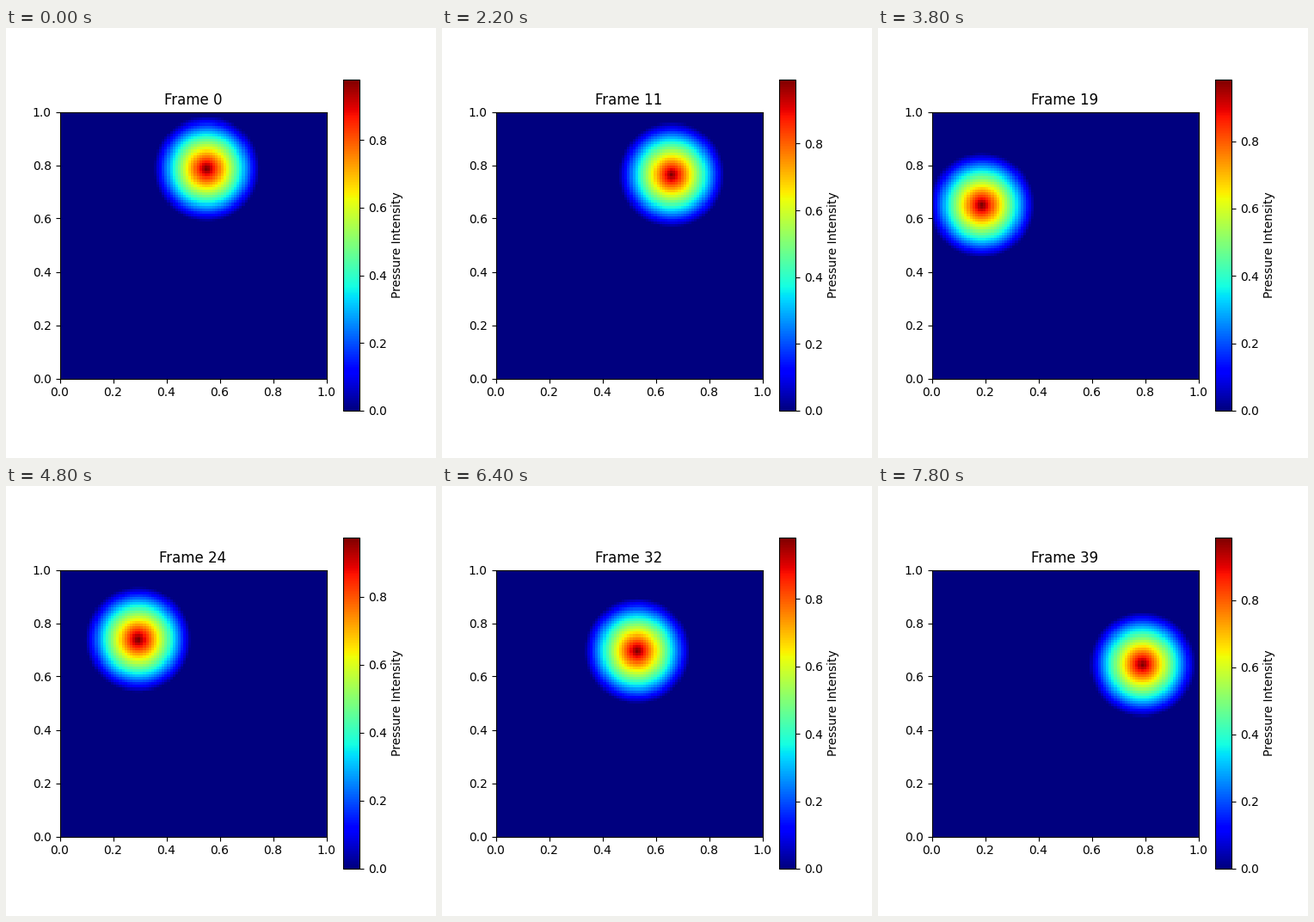
Recreate the animation shown at these times as a matplotlib script. Size 500 by 500 pixels, loop 8 s.

```python
import math
from itertools import pairwise

import matplotlib.pyplot as plt
import numpy as np
from matplotlib.animation import FuncAnimation

FRAMES = 40
RADIUS = 0.2
CELLS = 100
SWING = 0.13  # sideways pull-back and overshoot between stops

# Stops of the spot: step, x, y
STOPS = [(0, 0.5485, 0.7911), (7, 0.5575, 0.7510), (15, 0.7586, 0.7859),
         (19, 0.1825, 0.6532), (24, 0.2899, 0.7434), (32, 0.5275, 0.6998),
         (39, 0.7890, 0.6489)]

axis = np.linspace(0, 1, CELLS)
X, Y = np.meshgrid(axis, axis)


def contact(i):
    """Centre of the spot: swings rightward, lifts and jumps to go back."""
    (s0, x0, y0), (s1, x1, y1) = next(
        pair for pair in pairwise(STOPS) if i < pair[1][0] or i == FRAMES - 1 == pair[1][0])
    if x1 < x0:
        return x0, y0
    t = (i - s0) / (s1 - s0)
    x = x0 + (x1 - x0) * t - SWING * math.sin(2 * math.pi * t)
    return x, y0 + (y1 - y0) * t


def pressure(i):
    x, y = contact(i)
    return np.clip(1 - np.hypot(X - x, Y - y) / RADIUS, 0, 1)


fig, ax = plt.subplots(figsize=(5, 5), dpi=100)
image = ax.imshow(pressure(0), cmap="jet", origin="lower",
                  extent=[0, 1, 0, 1])
fig.colorbar(image, ax=ax, label="Pressure Intensity")
title = ax.set_title("Frame 0")


def update(i):
    field = pressure(i)
    image.set_data(field)
    image.set_clim(0, field.max())
    title.set_text(f"Frame {i}")
    return image, title


anim = FuncAnimation(fig, update, frames=FRAMES, interval=200,
                     repeat=True, repeat_delay=0, blit=False)
plt.show()
```
